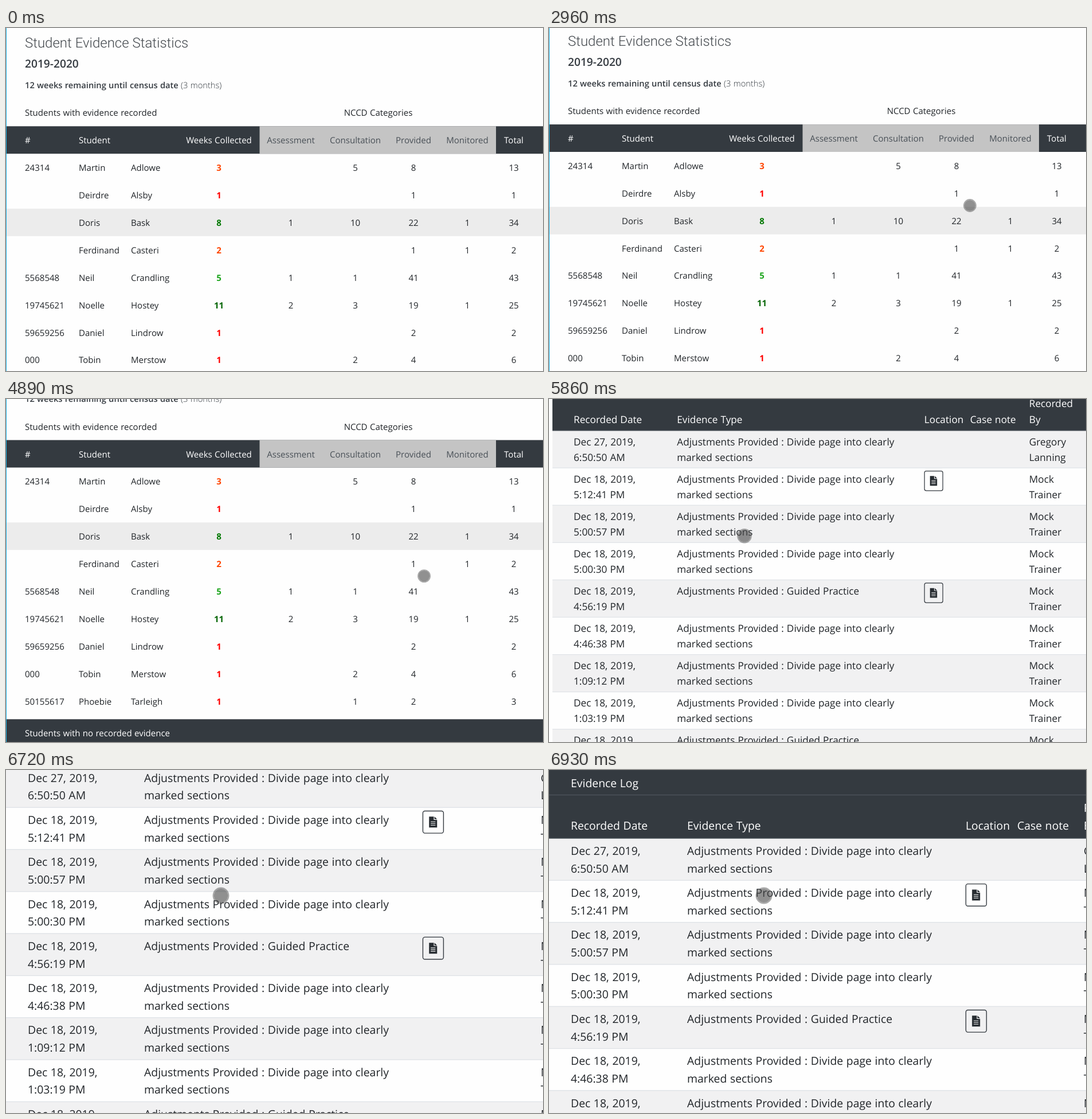
An HTML page for the animation above (7030 ms loop, 937 by 598 pixels).

```html
<!DOCTYPE html>
<html lang="en">
<head>
<meta charset="utf-8">
<title>Student Evidence Statistics</title>
<style>
  html, body { margin: 0; width: 100%; height: 100%; overflow: hidden; background: #fefefe; }
  svg { display: block; width: 937px; height: 598px; }
  text {
    font-family: "Open Sans", "Noto Sans", sans-serif;
    font-size: 15.04px;
    word-spacing: .03em;
    fill: #212529;
    text-rendering: geometricPrecision;
    white-space: pre;
  }
  .mid { text-anchor: middle; }
  .white { fill: #fff; }
  .grey { fill: #495057; }
  .bold { font-weight: 700; }
  .title { font: 300 24px Roboto, sans-serif; word-spacing: 0; fill: #43484d; }
  .year { font-size: 19.2px; font-weight: 600; fill: #343a40; }
  .census { font-size: 14.7px; font-weight: 600; fill: #343a40; }
  .light { font-weight: 300; }
  #log text { font-size: 19.4px; }
</style>
</head>
<body>
<svg viewBox="0 0 937 598">
  <rect width="937" height="598" fill="#fefefe"/>
  <g id="statsView">
    <rect width="1" height="598" fill="#1fb5e6"/>
    <g id="stats"></g>
  </g>
  <g id="log"></g>
  <g id="pointer">
    <circle r="9.6" fill="#464646" fill-opacity=".6"/>
    <circle r="10.5" fill="none" stroke="#5a5a5a" stroke-opacity=".52" stroke-width="1.9"/>
  </g>
</svg>
<script>
const NS = "http://www.w3.org/2000/svg";
const LOOP = 7030;
const DARK = "#343a40";
const $ = id => document.getElementById(id);
const stats = $("stats"), log = $("log"), pointer = $("pointer");

function add(parent, tag, attrs, content) {
  const el = document.createElementNS(NS, tag);
  for (const key in attrs) el.setAttribute(key, attrs[key]);
  if (content !== undefined) el.textContent = content;
  parent.appendChild(el);
  return el;
}
const rect = (parent, x, y, width, height, fill) =>
  add(parent, "rect", { x, y, width, height, fill });
const label = (parent, x, y, content, cls = "") =>
  add(parent, "text", { x, y, class: cls }, content);

// Statistics page
const ROW = 47.9, HEAD = 171.3, BODY = 219.2;
const COLS = [371.5, 497, 609.5, 711, 805, 886];
const WEEK_COLORS = { 1: "#f00", 2: "#ff4500", 3: "#ff4500", 5: "#1da51d", 8: "#007800", 11: "#006400" };
const students = [
  ["24314", "Martin", "Adlowe", 3, "", 5, 8, "", 13],
  ["", "Deirdre", "Alsby", 1, "", "", 1, "", 1],
  ["", "Doris", "Bask", 8, 1, 10, 22, 1, 34],
  ["", "Ferdinand", "Casteri", 2, "", "", 1, 1, 2],
  ["5568548", "Neil", "Crandling", 5, 1, 1, 41, "", 43],
  ["19745621", "Noelle", "Hostey", 11, 2, 3, 19, 1, 25],
  ["59659256", "Daniel", "Lindrow", 1, "", "", 2, "", 2],
  ["000", "Tobin", "Merstow", 1, "", 2, 4, "", 6],
  ["50155617", "Phoebie", "Tarleigh", 1, "", 1, 2, "", 3]
];

function buildStats() {
  label(stats, 33, 34.3, "Student Evidence Statistics", "title");
  label(stats, 33, 68.8, "2019-2020", "year");
  const census = label(stats, 33, 104.8, "12 weeks remaining until census date ", "census");
  add(census, "tspan", { class: "light" }, "(3 months)");
  label(stats, 33, 153.4, "Students with evidence recorded");
  label(stats, 649.5, 153.4, "NCCD Categories", "mid");

  rect(stats, 1, HEAD, 936, ROW, DARK);
  rect(stats, 442.5, HEAD, 412.5, ROW, "#c4c4c4");
  label(stats, 33, 201.3, "#", "white");
  label(stats, 127, 201.3, "Student", "white");
  ["Weeks Collected", "Assessment", "Consultation", "Provided", "Monitored", "Total"].forEach((name, i) =>
    label(stats, COLS[i], 201.3, name, "mid " + (i % 5 ? "grey" : "white")));

  rect(stats, 1, BODY + 2 * ROW, 936, ROW, "#ececec");
  students.forEach(([id, first, last, ...counts], i) => {
    const y = BODY + i * ROW + 29.9;
    label(stats, 33, y, id);
    label(stats, 127, y, first);
    label(stats, 218, y, last);
    counts.forEach((n, c) => {
      const cell = label(stats, COLS[c], y, n, c ? "mid" : "mid bold");
      if (!c) cell.style.fill = WEEK_COLORS[n];
    });
  });
  rect(stats, 1, 658, 936, 60, DARK);
  label(stats, 33, 687.8, "Students with no recorded evidence", "white");
}

// Evidence log page
const LOG_TOP = 119, LOG_ROW = 73.3, LEFT = -3.7, WIDE = 1070;
const times = ["6:50:50 AM", "5:12:41 PM", "5:00:57 PM", "5:00:30 PM", "4:56:19 PM",
  "4:46:38 PM", "1:09:12 PM", "1:03:19 PM", ""];

function fileButton(x, y, paper) {
  const g = add(log, "g", { transform: `translate(${x} ${y})` });
  add(g, "rect", { x: .7, y: .7, width: 36, height: 38.6, rx: 3.5, fill: "none", stroke: DARK, "stroke-width": 1.4 });
  add(g, "path", { d: "M11.5 10.5h8.2v5.6h5.8v13.4h-14zM20.9 10.5l4.6 4.5h-4.6z", fill: "#272c31" });
  add(g, "path", { d: "M14.4 19.4h8.2M14.4 22.4h8.2M14.4 25.4h8.2", stroke: paper, "stroke-width": 1.1 });
}

function buildLog() {
  rect(log, LEFT, 0, WIDE, LOG_TOP, DARK);
  rect(log, LEFT, 42.8, WIDE, 1.4, "#4b535b");
  label(log, 38, 29.5, "Evidence Log", "white");
  [[38, "Recorded Date"], [241, "Evidence Type"], [727, "Location"], [817, "Case note"], [933, "By"]]
    .forEach(([x, name]) => label(log, x, 104, name, "white"));
  label(log, 933, 73.3, "Recorded", "white");

  times.forEach((time, i) => {
    const y = LOG_TOP + i * LOG_ROW;
    const guided = i === 4 || i === 8;
    const [first, last] = i ? ["Mock", "Trainer"] : ["Gregory", "Lanning"];
    const line1 = y + 28.8, line2 = y + 59.5;
    const paper = i % 2 ? "#fefefe" : "#f1f1f2";
    rect(log, LEFT, y, WIDE, LOG_ROW + 1, paper);
    rect(log, LEFT, y - .6, WIDE, 1.3, i ? "#dee2e6" : "#454d55");
    label(log, 38, line1, i ? "Dec 18, 2019," : "Dec 27, 2019,");
    label(log, 38, line2, time);
    label(log, 241, line1, "Adjustments Provided : " + (guided ? "Guided Practice" : "Divide page into clearly"));
    if (!guided) label(log, 241, line2, "marked sections");
    label(log, 933, line1, first);
    label(log, 933, line2, last);
    if (i === 1 || i === 4) fileButton(726.7, y + 5.6, paper);
  });
}

// Motion
const mix = (a, b, p) => a + (b - a) * p;
const easeOut = p => 1 - (1 - p) ** 2;
const sine = p => (1 - Math.cos(Math.PI * p)) / 2;
const cubic = p => p < .5 ? 4 * p ** 3 : 1 - 4 * (1 - p) ** 3;

// Number of updates shown by time t, for n updates evenly spread over start..end
function steps(t, start, end, n) {
  if (t < start) return 0;
  return Math.min(n, 1 + Math.floor((t - start) * (n - 1) / (end - start) + .001));
}

function place(x, y, scale) {
  pointer.setAttribute("transform", `translate(${x} ${y}) scale(${scale})`);
}

function draw(t) {
  const onLog = t >= 5860;
  $("statsView").style.display = onLog ? "none" : "";
  log.style.display = onLog ? "" : "none";
  pointer.style.display = t >= 1720 ? "" : "none";

  if (!onLog) {
    const scroll = 99.7 * cubic(steps(t, 2960, 3100, 5) / 5);
    stats.setAttribute("transform", `translate(0 ${-scroll})`);
    const enter = easeOut(Math.max(0, steps(t, 1720, 2060, 11) - 1) / 10);
    const cross = sine(steps(t, 4890, 5370, 15) / 15);
    place(mix(mix(875, 734.4, enter), 289, cross), mix(mix(585.5, 309.5, enter), 232, cross), 1);
    return;
  }
  const zoom = (steps(t, 5860, 5930, 3) - 1) / 2;
  const distance = 128.6;
  const scroll = distance * cubic(steps(t, 6720, 6930, 7) / 7);
  const scale = mix(.888, 1, zoom);
  const y = mix(-50.7, -distance, zoom) + scroll;
  log.setAttribute("transform", `translate(${mix(9.26, 0, zoom)} ${y}) scale(${scale})`);
  place(mix(341, 375, zoom), mix(238.7, 219, zoom), 1.26 * scale);
}

buildStats();
buildLog();
const begin = performance.now();
function tick(now) {
  draw(Math.max(0, now - begin) % LOOP);
  requestAnimationFrame(tick);
}
draw(0);
requestAnimationFrame(tick);
</script>
</body>
</html>
```
